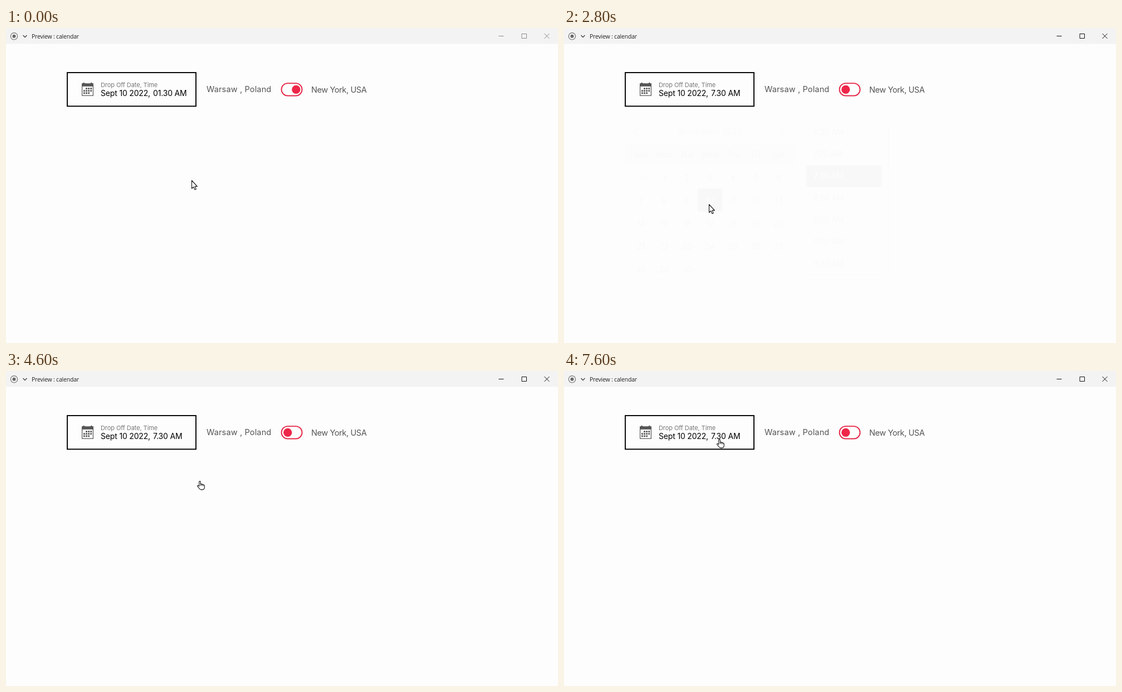
These frames come from a looping animation (991x565 px, 8000 ms). An HTML page:

```html
<!DOCTYPE html>
<html lang="en">
<head>
<meta charset="utf-8">
<title>Calendar preview</title>
<style>
  html, body { margin: 0; width: 100%; height: 100%; overflow: hidden; background: #fdfdfd; }
  svg { display: block; width: 991px; height: 565px; }
  text { font-family: Inter, "Open Sans", sans-serif; font-size: 14px; fill: #000; white-space: pre; }
  .title { font-family: "Open Sans", "Noto Sans", sans-serif; font-size: 10.5px; letter-spacing: -.2px; fill: #222; }
  .caption { font-size: 11px; letter-spacing: -.08px; fill: #777; }
  .stamp { letter-spacing: -.17px; }
  .city { font-size: 14.5px; fill: #555; }
  .mid { text-anchor: middle; }
  .head { font-size: 14.5px; }
  .slot { letter-spacing: -.22px; }
  .muted { fill: #a4a4a4; font-weight: 500; }
  .picked { fill: #fff; font-weight: 600; }
  .line { fill: none; }
</style>
</head>
<body>
<svg viewBox="0 0 991 565">
  <rect width="991" height="565" fill="#fdfdfd"/>

  <rect width="991" height="28.5" fill="#f3f3f3"/>
  <circle cx="14.5" cy="14.8" r="6.2" class="line" stroke="#747474" stroke-width="1.2"/>
  <circle cx="14.5" cy="14.8" r="3" fill="#686868"/>
  <path d="M30.5 13 34 16.5 37.5 13" class="line" stroke="#444" stroke-width="1.3"/>
  <text x="46" y="18.6" class="title">Preview : calendar</text>
  <path id="controls" d="M884.5 14.5H893.5M926 10.5H934.5V18.5H926ZM966.5 10 975.5 19M975.5 10 966.5 19" class="line" stroke-width="1"/>

  <g id="panel">
    <rect x="110" y="142" width="495.5" height="309.3" class="line" stroke="#e1e1e1" stroke-width="1.6"/>
    <rect x="109.5" y="206" width="304.5" height="40.5" fill="#f3f3f3"/>
    <path d="M134 178.2 126.5 185.7 134 193.2M389 178.2 396.5 185.7 389 193.2" class="line" stroke="#777" stroke-width="1.7"/>
    <text x="262.3" y="191.4" class="city mid">September 2022</text>
    <rect x="240" y="288" width="44" height="41" fill="#000"/>
    <g id="days"></g>
    <g id="slots"></g>
    <path d="M582.3 176V446" stroke="#dedede" stroke-width="1.5"/>
    <path d="M582.3 176V248.5" stroke="#707070" stroke-width="1.5"/>
  </g>

  <rect x="110" y="80" width="231" height="60.3" fill="#fdfdfd" stroke="#000" stroke-width="1.9"/>
  <g id="icon" fill="#555">
    <path d="M136 99.3H138.5V98H141V99.3H152V98H154.5V99.3H157V104.6H136Z"/>
    <rect x="136.6" y="104" width="19.8" height="17.2" class="line" stroke="#555" stroke-width="1.2"/>
  </g>
  <text x="170" y="105.5" class="caption">Drop Off Date, Time</text>
  <text x="170" y="121.8" class="stamp">Sept 10 2022,</text>
  <text id="late" x="264" y="121.8" class="stamp">01.30 AM</text>
  <text id="early" x="264" y="121.8" class="stamp">7.30 AM</text>

  <text x="360" y="115" class="city" letter-spacing=".15">Warsaw , Poland</text>
  <text x="548" y="115.6" class="city" letter-spacing="-.4">New York, USA</text>
  <rect x="494.5" y="99.1" width="37" height="22.4" rx="11.2" fill="#fff" stroke="#e62848" stroke-width="1.9"/>
  <circle id="knob" cy="110.4" r="7.7" fill="#ee2648"/>

  <g id="cursor" stroke="#111" fill="#fff" stroke-width="1.1" stroke-linejoin="round">
    <path id="arrow" d="M.5 .5V15L3.8 12 6 17.1 8.3 16.1 6.1 11.1H10.4Z"/>
    <g id="hand">
      <path d="M3.7 9.8V1.9Q3.9 .6 5 .6T6.3 1.9V6Q7.8 5 8.6 6.4 10.2 5.6 11 7 13.3 6.6 13.3 9V11.8Q13.3 15.7 9.6 15.9H7.4Q5.3 15.8 4 13.7L.8 10Q.2 8.7 1.3 8.3 2.5 8.2 3.7 9.8Z"/>
      <path d="M6.3 6V9M8.6 6.4V9.2M11 7V9.6" class="line" stroke-width=".9"/>
    </g>
  </g>
</svg>
<script>
const LOOP = 8000, TICK = 200;
const $ = id => document.getElementById(id);

function add(parent, tag, attrs, label) {
  const el = document.createElementNS("http://www.w3.org/2000/svg", tag);
  for (const key in attrs) el.setAttribute(key, attrs[key]);
  if (label !== undefined) el.textContent = label;
  parent.append(el);
}

function buildDays() {
  const colX = c => 138.5 + 41.17 * c;
  ["Sun", "Mon", "Tue", "Wed", "Thu", "Fri", "Sat"].forEach((name, c) =>
    add($("days"), "text", { x: colX(c), y: 231.8, class: "mid head" }, name));
  for (let i = 0; i < 35; i++) {
    const outside = i < 1 || i > 30;
    const label = i < 1 ? 31 : i > 30 ? i - 30 : i;
    const look = outside ? "muted" : i === 10 ? "picked" : "";
    add($("days"), "text", { x: colX(i % 7), y: 273.7 + 41.15 * Math.floor(i / 7), class: "mid " + look }, label);
  }
}

function buildSlots() {
  for (let i = 0; i < 7; i++) {
    const half = i + 13, y = 206.5 + 39.35 * i, chosen = i === 2;
    if (chosen) add($("slots"), "rect", { x: 435, y: 246, width: 135.5, height: 39.2, fill: "#000" });
    else if (i !== 1) add($("slots"), "path", { d: `M435 ${y}H570.5`, stroke: "#dedede", "stroke-width": 1.5 });
    add($("slots"), "text", { x: 447.8, y: y - 15, class: "slot" + (chosen ? " picked" : "") },
      `${Math.floor(half / 2)}.${half % 2 ? "30" : "00"} AM`);
  }
}

function buildIcon() {
  for (let r = 0; r < 3; r++)
    for (let c = 0; c < 4; c++)
      if (r + c > 0 && r + c < 5)
        add($("icon"), "rect", { x: 139 + 4.1 * c, y: 107.2 + 4.1 * r, width: 2.8, height: 2.8 });
}

// time, x, y, hand
const path = [
  [0, 333, 273, 0], [200, 284, 195, 0], [400, 237, 122, 1], [800, 237, 122, 1],
  [1000, 234, 124, 0], [1400, 230, 126, 0], [1800, 236, 140, 0], [2000, 244, 190, 0],
  [2400, 259, 312, 1], [2800, 260, 316, 0], [3000, 258, 220, 0], [3200, 256, 122, 1],
  [3400, 256, 122, 0], [3800, 258, 176, 0], [4000, 262, 270, 0], [4200, 264, 303, 1],
  [4400, 300, 256, 1], [4600, 343, 197, 1], [4800, 440, 142, 0], [5000, 503, 108, 1],
  [5400, 500, 110, 1], [5600, 435, 139, 0], [6000, 505, 112, 1], [6400, 514, 108, 1],
  [6800, 510, 110, 1], [7000, 440, 115, 1], [7600, 274, 122, 1], [8000, 274, 122, 1]
];

const clamp = v => Math.min(1, Math.max(0, v));
const ease = (t, start, span) => 1 - (1 - clamp((t - start) / span)) ** 2;

const panelAt = t =>
  ease(t, 800, 500) - ease(t, 2400, 460) + ease(t, 3200, 680) - ease(t, 4150, 400);
const toggleAt = t =>
  1 - ease(t, 0, 400) + ease(t, 5000, 400) - ease(t, 6400, 400);

function cursorAt(t) {
  const i = path.findIndex(p => p[0] > t);
  const [t0, x0, y0, hand] = path[i - 1], [t1, x1, y1] = path[i];
  const u = (t - t0) / (t1 - t0);
  return { x: x0 + (x1 - x0) * u, y: y0 + (y1 - y0) * u, hand };
}

function draw(t) {
  const open = clamp(panelAt(t)), on = clamp(toggleAt(t)), cur = cursorAt(t);
  $("controls").setAttribute("stroke", t < 800 ? "#8a8a8a" : "#111");
  $("panel").setAttribute("opacity", open);
  $("knob").setAttribute("cx", 505.7 + 15.1 * on);
  $("late").setAttribute("opacity", on);
  $("early").setAttribute("opacity", 1 - on);
  $("cursor").setAttribute("transform", `translate(${cur.x} ${cur.y})`);
  $("arrow").setAttribute("display", cur.hand ? "none" : "inline");
  $("hand").setAttribute("display", cur.hand ? "inline" : "none");
}

buildDays();
buildSlots();
buildIcon();
const begin = performance.now();
function frame() {
  const t = (performance.now() - begin) % LOOP;
  draw(Math.floor(t / TICK) * TICK);
  requestAnimationFrame(frame);
}
frame();
</script>
</body>
</html>
```
